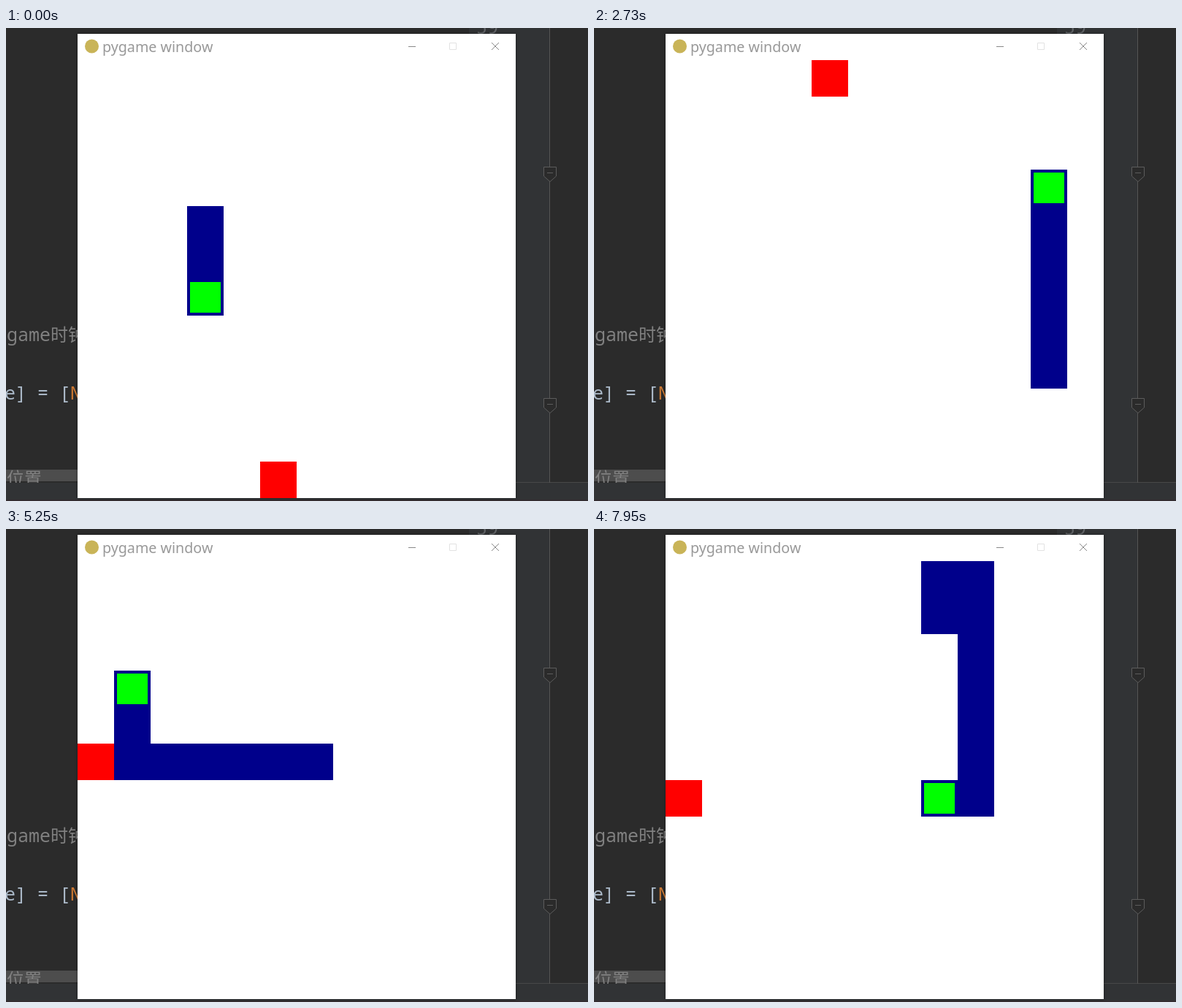
Recreate the animation shown at these times as an HTML page. Size 797 by 648 pixels, loop 8 s.

```html
<!DOCTYPE html>
<html lang="en">
<head>
<meta charset="utf-8">
<title>pygame window</title>
<style>
  html, body { margin: 0; width: 100%; height: 100%; overflow: hidden; background: #2b2b2b; }
  svg { display: block; width: 797px; height: 648px; }
  .code { font: 25px "Noto Sans Mono", "Noto Sans CJK SC", "Noto Sans CJK", monospace; white-space: pre; }
  .cjk { font-size: 24px; }
  .title { font: 19.7px "Noto Sans", "Open Sans", sans-serif; fill: #999; }
  .window { fill: #fff; filter: drop-shadow(0 0 2px rgba(0, 0, 0, .35)); }
</style>
</head>
<body>
<svg viewBox="0 0 797 648">
  <defs>
    <clipPath id="editor"><path d="M0 0H797V623H0z"/></clipPath>
    <g id="fold" fill="#2b2b2b" stroke="#5c5c5c">
      <path d="M-8.500 .5H8.500V13L0 20.500L-8.500 13z"/>
      <path d="M-4 8.500H4"/>
    </g>
  </defs>

  <path fill="#2b2b2b" d="M0 0H797V648H0z"/>
  <path fill="#313335" d="M634 0H744V623H634zM0 623H797V646H0z"/>
  <path fill="#332d30" d="M0 646H797V648H0z"/>
  <path fill="#4d4d4d" d="M0 605H98V621H0z"/>
  <path fill="#484848" d="M698 622H797V623H698z"/>
  <path fill="#555" d="M744 0H745V623H744z"/>
  <use href="#fold" x="745" y="190"/>
  <use href="#fold" x="745" y="507"/>
  <g class="code" clip-path="url(#editor)">
    <text x="644" y="8" fill="#606366">59</text>
    <text x="1" y="429" fill="#808080">game<tspan class="cjk">时钟</tspan></text>
    <text x="-2" y="509" fill="#a9b7c6">e] = [<tspan fill="#cc7832">N</tspan></text>
    <text class="cjk" x="1" y="626" fill="#808080">位置</text>
  </g>

  <path class="window" d="M98 8H698V644H98z"/>
  <circle cx="117.500" cy="25" r="9.500" fill="#c9b458"/>
  <text class="title" x="132" y="33">pygame window</text>
  <g fill="none">
    <path stroke="#888" d="M551 25.500H561M665 20L675 30M675 20L665 30"/>
    <path stroke="#e2e2e2" d="M607.500 20.500H616.500V29.500H607.500z"/>
  </g>

  <g transform="translate(98 44)" shape-rendering="crispEdges">
    <path id="food" fill="#f00"/>
    <path id="body" fill="#00008b"/>
    <path id="head" fill="#0f0"/>
  </g>
</svg>
<script>
const LOOP = 8000, REFRESH = 75, CELL = 50, START_LENGTH = 3;

// Runs of moves, beginning at the tail of the first pose.
const ROUTE = "D5 R1 D2 R1 U7 R1 U4 R1 D4 R2 D7 R1 U8 L4 U3 L2 D4 R3 D7 R1 " +
  "U6 L7 U5 L1 D11 R6 U1 R1 U10 R1 D6 L1";
const STEPS = { U: [0, -1], D: [0, 1], L: [-1, 0], R: [1, 0] };
const FOODS = [[5, 11], [7, 4], [10, 7], [4, 0], [8, 5], [0, 5], [8, 6], [0, 6]];

// Key points of the game's uneven speed: time in ms, moves made.
const PACE = [[0, 0], [860, 14], [1650, 25], [2730, 42], [4250, 65],
  [5250, 81], [6480, 100], [6630, 101], [6950, 106], [7950, 122]];

const route = [[3, 4]];
for (const run of ROUTE.split(" ")) {
  const [dx, dy] = STEPS[run[0]];
  for (let i = +run.slice(1); i > 0; i--) {
    const [x, y] = route.at(-1);
    route.push([x + dx, y + dy]);
  }
}

// Moves made at a time, as last shown by the periodic screen refresh.
function movesAt(time) {
  const next = PACE.findIndex(([t]) => t > time);
  if (next < 0) return PACE.at(-1)[1];
  const [t0, m0] = PACE[next - 1], [t1, m1] = PACE[next];
  const refreshes = Math.round((t1 - t0) / REFRESH);
  const shown = Math.floor((time - t0) / (t1 - t0) * refreshes);
  return Math.floor(m0 + (m1 - m0) * shown / refreshes);
}

// Replays the game up to a move: each food eaten makes way for the next.
function poseAt(moves) {
  const end = START_LENGTH + moves;
  let eaten = 0;
  for (let i = START_LENGTH; i < end; i++) {
    if (String(route[i]) === String(FOODS[eaten])) eaten++;
  }
  return { food: FOODS[eaten], snake: route.slice(end - START_LENGTH - eaten, end) };
}

function square([x, y], inset = 0) {
  const size = inset ? CELL - 2 * inset : CELL;
  return `M${x * CELL + inset} ${y * CELL + inset}h${size}v${size}h${-size}z`;
}

const [food, body, head] = ["food", "body", "head"].map(id => document.getElementById(id));

function draw(time) {
  const pose = poseAt(movesAt(time));
  food.setAttribute("d", square(pose.food));
  body.setAttribute("d", pose.snake.map(cell => square(cell)).join(""));
  head.setAttribute("d", square(pose.snake.at(-1), 4));
}

const start = performance.now();
function tick() {
  draw((performance.now() - start) % LOOP);
  requestAnimationFrame(tick);
}
tick();
</script>
</body>
</html>
```
